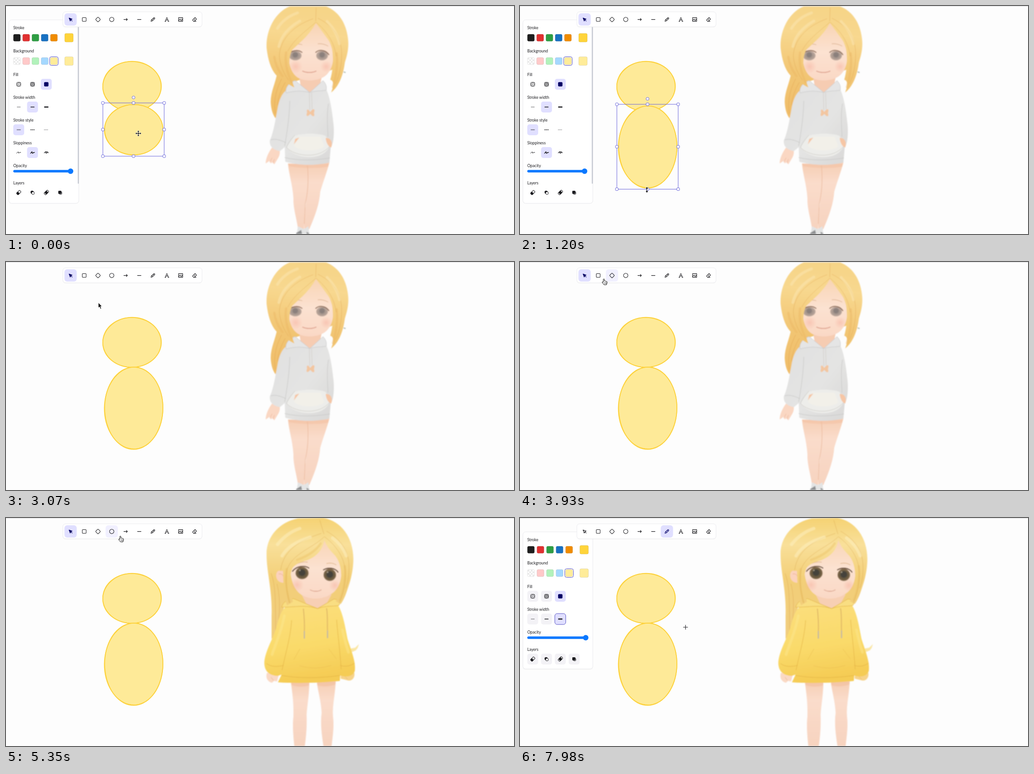
Recreate the animation shown at these times as an HTML page. Size 1117 px wide and 501 px high, loop 8000 ms.

```html
<!DOCTYPE html>
<html lang="en">
<head>
<meta charset="utf-8">
<title>Sketch board</title>
<style>
html, body { margin: 0; width: 100%; height: 100%; overflow: hidden; background: #fdfdfd; }
svg { display: block; width: 1117px; height: 501px; }
text { font: 8.7px Lato, "Open Sans", sans-serif; fill: #1b1b1f; }
.ink { fill: none; stroke: #1b1b1f; stroke-linecap: round; stroke-linejoin: round; }
.on { stroke: #030064; }
.line { fill: none; stroke-linecap: round; stroke-linejoin: round; }
</style>
</head>
<body>
<svg viewBox="0 0 1117 501">
<defs>
  <linearGradient id="hairA" gradientUnits="userSpaceOnUse" x1="660" y1="0" x2="640" y2="245">
    <stop offset="0" stop-color="#f6d487"/><stop offset=".25" stop-color="#f8d88f"/><stop offset=".6" stop-color="#f2c674"/><stop offset="1" stop-color="#f0bd69"/>
  </linearGradient>
  <linearGradient id="hairB" gradientUnits="userSpaceOnUse" x1="670" y1="0" x2="670" y2="265">
    <stop offset="0" stop-color="#f5d273"/><stop offset=".22" stop-color="#f9e09a"/><stop offset=".5" stop-color="#f3cf78"/><stop offset="1" stop-color="#f1cd7d"/>
  </linearGradient>
  <linearGradient id="skin" x1="0" y1="0" x2="0" y2="1">
    <stop offset="0" stop-color="#f8d4b4"/><stop offset=".5" stop-color="#fce2d1"/><stop offset="1" stop-color="#fad8c5"/>
  </linearGradient>
  <linearGradient id="leg" x1="0" y1="0" x2="0" y2="1">
    <stop offset="0" stop-color="#f6ceb4"/><stop offset=".3" stop-color="#fadccb"/><stop offset="1" stop-color="#f7d3bf"/>
  </linearGradient>
  <linearGradient id="grey" x1="0" y1="0" x2="1" y2="1">
    <stop offset="0" stop-color="#e0e0e0"/><stop offset=".55" stop-color="#e4e4e3"/><stop offset="1" stop-color="#d9d8d7"/>
  </linearGradient>
  <linearGradient id="gold" x1="0" y1="0" x2=".2" y2="1">
    <stop offset="0" stop-color="#fbdf7e"/><stop offset=".6" stop-color="#fada6a"/><stop offset="1" stop-color="#f5cc55"/>
  </linearGradient>
  <radialGradient id="blush"><stop offset="0" stop-color="#f5a997" stop-opacity=".45"/><stop offset="1" stop-color="#f5a997" stop-opacity="0"/></radialGradient>
  <radialGradient id="eyeA"><stop offset="0" stop-color="#968a86"/><stop offset=".6" stop-color="#a8988f"/><stop offset="1" stop-color="#c2aca0"/></radialGradient>
  <radialGradient id="eyeB"><stop offset="0" stop-color="#4e4a3c"/><stop offset=".65" stop-color="#66573f"/><stop offset="1" stop-color="#8a7150"/></radialGradient>
  <filter id="soft" x="-5%" y="-5%" width="110%" height="110%"><feGaussianBlur stdDeviation=".8"/></filter>
</defs>
<rect width="1117" height="501" fill="#fdfdfd"/>
<rect width="1117" height="1" fill="#dcdcde"/>

<g id="girlA" filter="url(#soft)">
  <path fill="url(#hairA)" d="M596 148C593 168 582 188 582 211C583 230 588 241 593 247C596 234 602 218 608 204L634 172Z"/>
  <path class="line" stroke="#e0a352" opacity=".7" d="M606 160C594 184 588 206 592 236M614 168C604 185 599 200 597 218"/>
  <path fill="url(#hairA)" d="M624 1C590 14 571 56 573 92C576 118 582 138 594 152L628 168L712 142L743 130C752 105 754 88 752 72C748 38 732 12 704 1Z"/>
  <g fill="url(#leg)">
    <path d="M661 346L711 344C706 364 697 387 691 408C689 434 681 458 667 490H656C656 454 660 430 662 404Z"/>
    <path d="M620 346L664 348C666 385 663 411 658 435C656 460 657 475 655 491L642 489C639 466 631 444 632 422C630 392 622 370 620 346Z"/>
  </g>
  <path class="line" stroke="#e8b394" d="M663 351C666 386 663 414 658 434L656 478"/>
  <path fill="#f1bd9e" opacity=".45" d="M621 347H710L708 353C688 357 650 357 622 352Z"/>
  <path fill="#e3e4e4" d="M642 484L655 490L665 484L667 501H639Z"/>
  <path fill="#8e9092" d="M638 499L649 492L651 501H638ZM661 496L667 500V501H661Z"/>
  <path fill="#fad7c3" d="M585 311L602 317C603 328 599 333 596 338L590 348L586 343L582 346L580 340L571 346C571 335 577 322 585 311Z"/>
  <path class="line" stroke="#eab497" d="M590 337L587 345M585 334L580 343"/>
  <path fill="url(#grey)" d="M618 184C607 191 600 207 597 226C592 253 588 278 580 296C579 309 588 316 602 319L613 310L614 342C642 351 682 351 711 344L714 311C721 302 722 275 720 259C717 231 713 203 705 185C690 174 648 175 618 184Z"/>
  <path class="line" stroke="#c6c6c5" d="M624 209C623 245 619 270 613 307M709 215C705 238 707 260 708 287M582 294C594 291 604 295 615 300M613 333C646 341 680 339 712 334"/>
  <path fill="#ededea" d="M634 285C655 279 684 279 702 285L714 303C706 325 688 332 666 332C645 332 624 323 617 310Z"/>
  <path fill="#f2f0e9" d="M644 287H692L700 308C688 321 646 321 633 307Z"/>
  <path class="line" stroke="#cbc9c4" d="M635 284C625 295 619 304 617 311C634 330 691 339 714 305"/>
  <path fill="#f6c6a5" d="M703 290C715 289 719 301 715 311C709 309 704 301 703 290ZM636 292L645 289L633 304Z"/>
  <path fill="#f6ccb2" d="M645 157H694L690 176L668 190L648 177Z"/>
  <path fill="#e5e5e5" stroke="#c9c9c9" d="M636 164L668 190C647 185 631 187 616 191C613 180 622 168 636 164ZM697 164L668 190C680 186 694 187 704 185C706 176 702 169 697 164Z"/>
  <path class="line" stroke="#d2cdc6" d="M667 191L668 228M672 191L673 226"/>
  <path fill="#f3c6a0" d="M669 233C664 224 660 227 662 234C659 241 662 246 669 237C676 246 680 242 677 235C681 226 675 223 669 233Z"/>
  <path fill="url(#skin)" d="M622 92L682 38L720 90C722 123 716 144 700 155C683 166 655 166 641 157C625 146 619 121 622 92Z"/>
  <circle cx="637" cy="133" r="15" fill="url(#blush)"/><circle cx="704" cy="133" r="13" fill="url(#blush)"/>
  <g fill="url(#eyeA)"><ellipse cx="636" cy="109" rx="14" ry="10.5"/><ellipse cx="695" cy="109" rx="13" ry="10.5"/></g>
  <g fill="#847a77" opacity=".7"><ellipse cx="636" cy="107" rx="6" ry="6"/><ellipse cx="695" cy="107" rx="6" ry="6"/></g>
  <path class="line" stroke="#86644f" stroke-width="2" d="M620 108C626 97 642 95 651 102M681 102C688 95 703 96 710 107"/>
  <path class="line" stroke="#d2a27c" d="M629 88C637 83 645 83 651 85M686 83C694 82 703 85 708 88"/>
  <path class="line" stroke="#d89480" stroke-width="1.4" d="M652 143C660 147 674 147 682 143"/>
  <path fill="url(#hairA)" d="M682 36C668 64 646 80 629 97C618 119 624 150 634 179C620 172 606 162 597 150C580 120 585 64 611 31C632 10 660 16 682 36ZM681 36C698 54 712 74 717 95C721 120 718 145 713 162C720 164 722 172 715 190C733 176 742 150 745 124C752 75 737 35 708 15C696 11 686 20 681 36Z"/>
  <path class="line" stroke="#eab765" stroke-width="5" opacity=".45" d="M616 102C612 126 619 148 628 168M727 104C730 130 726 154 719 178M590 112C592 128 599 142 608 154"/>
  <g class="line" stroke="#dfa552" opacity=".6">
    <path d="M681 36C655 58 631 76 620 99M675 28C635 42 604 70 601 108C602 129 610 147 621 163M682 36C703 53 722 78 726 110M686 27C718 42 739 70 738 107C738 130 734 150 725 170M681 33L682 4"/>
  </g>
  <path class="line" stroke="#fbe7b4" stroke-width="6" opacity=".5" d="M646 33C622 47 605 65 600 89M706 34C721 49 730 67 733 83M641 15C619 23 606 34 597 49"/>
  <path class="line" stroke="#a9b6a7" stroke-width="2" d="M743 145L746 146"/>
</g>

<g id="girlB" filter="url(#soft)">
  <path fill="url(#hairB)" d="M642 1C600 9 571 43 573 82C573 118 586 160 584 214V266L600 246L612 192H728C744 182 760 139 763 105C769 49 740 7 698 0Z"/>
  <path class="line" stroke="#dda954" opacity=".7" d="M583 122C594 150 592 190 593 247M596 145C602 170 603 198 599 230"/>
  <g fill="url(#leg)">
    <path d="M626 358H667C667 390 662 412 661 432C662 457 660 480 657 501H634C631 474 630 453 632 436C633 406 629 380 626 358Z"/>
    <path d="M683 358H725C724 388 717 413 719 436C722 458 718 482 716 501H698C694 474 691 452 694 428C693 403 686 382 683 358Z"/>
  </g>
  <path fill="#efb994" opacity=".45" d="M627 360H667L666 368Q647 374 628 367ZM684 360H725L724 366Q704 373 685 368Z"/>
  <path fill="#fad9c5" d="M574 340L600 344L596 359L589 358L585 362C575 360 570 350 574 340Z"/>
  <path fill="#f7d38a" d="M736 344L766 340C768 350 761 359 752 357L736 353Z"/>
  <path class="line" stroke="#dda46f" opacity=".7" d="M583 350L588 357M746 349L751 354"/>
  <path fill="#fae6a4" d="M757 287L768 285L776 277L773 286L769 291L757 296Z"/>
  <path fill="url(#gold)" d="M621 190C606 199 600 219 594 242C585 270 568 296 568 320C569 337 579 346 597 347L606 344L598 361C642 364 696 362 734 358L735 346C749 351 763 348 767 336C770 317 759 291 751 266C745 234 740 206 729 190Z"/>
  <path class="line" stroke="#e4b444" d="M628 225C626 260 616 292 607 334M727 224C729 252 734 286 737 332M573 320C584 328 597 327 610 324M735 324C747 328 758 325 766 319M606 346C645 353 694 352 734 346"/>
  <path class="line" stroke="#eabf53" opacity=".8" d="M646 288L633 311M710 288L726 309M646 325Q681 335 715 324"/>
  <path class="line" stroke="#fde894" stroke-width="6" opacity=".4" d="M612 215C606 248 594 273 585 300M740 246Q746 274 753 295"/>
  <path fill="#f7cfb4" d="M650 168H716L706 186L685 198L660 188Z"/>
  <path fill="#f9de82" stroke="#e3b244" d="M632 177L685 199C657 190 638 196 606 196C609 185 619 178 632 177ZM721 178L685 199C704 192 718 195 732 192C738 184 732 179 721 178Z"/>
  <path class="line" stroke="#dcb264" stroke-width="1.8" d="M654 200C656 220 657 233 656 250M705 199C708 218 706 235 707 250"/>
  <path class="line" stroke="#bcb4a3" stroke-width="2.4" d="M656 249V264M707 248V263"/>
  <path fill="#fbd2bd" d="M615 119C602 110 594 117 594 126C594 138 604 145 615 141Z"/>
  <path class="line" stroke="#eaa88d" d="M600 123Q607 120 612 132"/>
  <path fill="url(#skin)" d="M625 99L698 44L738 101C740 135 732 157 715 167C696 180 668 180 650 169C632 157 624 133 625 99Z"/>
  <circle cx="640" cy="147" r="15" fill="url(#blush)"/><circle cx="723" cy="148" r="13" fill="url(#blush)"/>
  <g fill="url(#eyeB)"><ellipse cx="651" cy="121" rx="14.5" ry="13.5"/><ellipse cx="712" cy="125" rx="14" ry="13.5"/></g>
  <g fill="#45423a"><circle cx="651" cy="120" r="7"/><circle cx="712" cy="124" r="7"/></g>
  <g fill="#a59a86"><circle cx="646" cy="115" r="1.8"/><circle cx="707" cy="119" r="1.8"/></g>
  <path class="line" stroke="#61452f" stroke-width="2.3" d="M630 117C638 106 656 103 666 110M698 114C708 108 723 109 730 119"/>
  <path class="line" stroke="#d2a268" d="M641 100Q652 95 663 97M705 100Q717 97 726 103"/>
  <path class="line" stroke="#d2937b" stroke-width="1.4" d="M669 158C676 162 687 162 693 158"/>
  <path fill="url(#hairB)" d="M701 42C698 70 684 84 662 93C648 96 637 101 630 110C622 128 624 156 631 184L618 192C610 172 610 145 609 116C592 119 586 102 588 76C594 37 632 7 671 17C687 21 697 31 701 42ZM698 42C703 62 714 72 724 83C735 97 739 118 736 142C736 160 733 174 725 183L736 189C749 172 757 139 759 108C768 58 743 25 711 17C702 22 699 31 698 42Z"/>
  <path class="line" stroke="#e9bd62" stroke-width="5" opacity=".4" d="M617 112C613 138 618 163 623 184M745 106C748 134 741 164 734 180M640 92C660 85 680 74 692 56"/>
  <g class="line" stroke="#d9a64e" opacity=".6">
    <path d="M699 42C674 66 630 78 618 113C613 141 618 166 624 187M693 34C649 48 610 69 604 114M700 41C725 59 745 87 746 119C747 150 739 171 733 186M705 29C735 46 753 71 754 103C755 126 752 140 747 154M699 35L690 5"/>
  </g>
  <path class="line" stroke="#fdeebd" stroke-width="7" opacity=".55" d="M669 42C645 49 620 62 607 83M718 44C732 54 742 67 748 83M646 23C625 30 609 43 597 58"/>
</g>

<g id="shapes"></g>
<g id="select"></g>
<g id="panelA"></g>
<g id="panelB"></g>
<g id="bar"></g>
<g id="cursor"></g>
</svg>
<script>
const LOOP = 8000, $ = id => document.getElementById(id);
const at = (x, y, s) => `<g transform="translate(${x} ${y})">${s}</g>`;
const box = (x, y, w, h, r, fill, more = '') =>
  `<rect x="${x}" y="${y}" width="${w}" height="${h}" rx="${r}" fill="${fill}" ${more}/>`;
const ink = (d, w = 1, more = '') => `<path class="ink" d="${d}" stroke-width="${w}" ${more}/>`;
const show = (id, yes) => { $(id).style.display = yes ? '' : 'none'; };
const LILAC = '#e0dfff';

// Value on a list of [time, value], eased between the entries.
function track(keys, t) {
  let i = keys.findIndex(k => k[0] > t);
  if (i < 0) return keys[keys.length - 1][1];
  if (i === 0) return keys[0][1];
  const [t0, a] = keys[i - 1], [t1, b] = keys[i];
  const u = (t - t0) / (t1 - t0);
  return a + (b - a) * u * u * (3 - 2 * u);
}
const step = (keys, t) => keys.reduce((v, k) => k[0] <= t ? k[1] : v, -1);

function rough(cx, cy, rx, ry, seed) {
  const ring = p => {
    let d = '';
    for (let i = 0; i < 72; i++) {
      const a = i / 72 * Math.PI * 2;
      const k = 1 + .004 * Math.sin(2 * a + p) + .004 * Math.sin(3 * a + 2 * p);
      d += (i ? 'L' : 'M') + (cx + rx * k * Math.cos(a)).toFixed(2) + ' ' + (cy + ry * k * Math.sin(a)).toFixed(2);
    }
    return d + 'Z';
  };
  const pen = 'stroke="#fdd23c" stroke-width="1.6" stroke-linejoin="round"';
  return `<path d="${ring(seed)}" fill="#feea98" ${pen}/><path d="${ring(seed + 1.9)}" fill="none" ${pen}/>`;
}

function selection(x0, y0, x1, y1) {
  const mx = (x0 + x1) / 2, my = (y0 + y1) / 2, pen = 'stroke="#6965db"';
  let s = box(x0, y0, x1 - x0, y1 - y0, 0, 'none', pen);
  for (const x of [x0, mx, x1]) for (const y of [y0, my, y1])
    if (x !== mx || y !== my) s += box(x - 3, y - 3, 6, 6, 1.5, '#fff', pen);
  return s + `<circle cx="${mx}" cy="${y0 - 12}" r="3.2" fill="#fff" ${pen}/>`;
}

const TOOL_X = [142, 172, 202.3, 232.5, 263, 293, 323, 353.7, 384, 414.5];
const TOOLS = [
  'M-3.4-3.4L-.8 3.6L.5.5L3.6-.8ZM.5.5L3.6 3.6',
  'M-3-4.2H3Q4.2-4.2 4.2-3V3Q4.2 4.2 3 4.2H-3Q-4.2 4.2-4.2 3V-3Q-4.2-4.2-3-4.2Z',
  'M-.8-4.7Q0-5.4.8-4.7L4.7-.8Q5.4 0 4.7.8L.8 4.7Q0 5.4-.8 4.7L-4.7.8Q-5.4 0-4.7-.8Z',
  'M-4.8 0A4.8 4.8 0 1 1 4.8 0A4.8 4.8 0 1 1-4.8 0Z',
  'M-4 0H4M1.5-2.4L4 0L1.5 2.4',
  'M-4 0H4',
  'M-4.2 4.2L-3.6 1.4L2-4Q4-4.6 4.2-2.2L-1.4 3.5ZM.6-2.8L2.9-.6M-2.4.4L-.2 2.5',
  'M-3.4 4L-.4-4H.4L3.6 4M-2.1 1H2.1M-4.4 4H-2.2M2.2 4H4.6',
  'M-4.6-4H4.6V4H-4.6ZM-4.4 2.2L-1.5-.6L1.6 2.4L3-.2L4.6 1.4M1.8-1.8H2',
  'M-4.4 1L1.2-4.2L4.6-.8L-.6 4H-2.2ZM-1.8-1.4L1.7 2M-1 4H3.4'
];

function toolbar(active, hover) {
  let s = box(125, 14, 306, 33, 6, '#000', 'opacity=".035"') +
    box(125, 12.8, 306, 33, 6, '#fff', 'stroke="#ebebef"');
  TOOLS.forEach((d, i) => {
    const x = TOOL_X[i], on = i === active;
    if (on || i === hover) s += box(x - 13.5, 16, 27, 27, 6, on ? LILAC : '#f1f0ff');
    const fill = on && !i ? 'style="fill:#030064"' : '';
    s += at(x, 29.6, `<path class="ink ${on ? 'on' : ''}" d="${d}" stroke-width="1.05" ${fill}/>`);
  });
  return s;
}

const BX = [28, 58.3, 88.6, 119];
const hatch = 'M-3.6 0L0-3.6M-3.6 3.4L3.4-3.6M0 3.6L3.6 0';
const frame = box(-4.3, -4.3, 8.6, 8.6, 2, 'none', 'stroke="#1b1b1f"');
const fills = [
  frame + ink(hatch, .9),
  frame + ink(hatch + 'M3.6 0L0-3.6M3.6 3.4L-3.4-3.6M0 3.6L-3.6 0', .9),
  box(-4.8, -4.8, 9.6, 9.6, 2, '#030064')
];
const widths = [.7, 1.7, 2.5].map(w => ink('M-3.6 0H3.6', w));
const styles = [ink('M-4 0H4', .9), ink('M-4 0H4', 1.3, 'stroke-dasharray="1.4 2"'), ink('M-4.5 0H4.5', 1, 'stroke-dasharray=".1 1.8"')];
const waves = [
  ink('M-4.5 1.5Q-1.5-2-.8-1.4Q-1 2 0 1.3Q2-1 4.5-.3'),
  ink('M-4.5 2Q-1.6-2.5-.8-2Q-1.2 2.4 0 1.8Q2-1 4.5-.3M-4 1.4Q-1.5-1.8.2 1.5L4 0', 1.2),
  ink('M-4.5 1Q-2-2.6 0-1.6Q-2 2 .2 1.6Q1-.8 4.5.5M-4 .3Q0-3.5 3.6-1', 1.2)
];
const sheet = (x, y, fill) => box(x, y, 5.4, 5.4, 1.4, fill, 'stroke="#1b1b1f"');
const tilt = s => `<g transform="rotate(-45)">${s}</g>`;
const layers = [
  tilt(sheet(-5, -2.7, '#1b1b1f') + sheet(-.4, -2.7, '#fff')),
  sheet(-3.6, -3.6, '#1b1b1f') + sheet(-1.6, -1.6, '#fff'),
  tilt(sheet(-5, -2.7, '#fff') + sheet(.2, -2.7, '#fff') + sheet(-2.6, -2.7, '#1b1b1f')),
  sheet(-1.6, -1.6, '#fff') + box(-4, -4, 6.8, 6.8, 1.4, '#1b1b1f')
];

function buttons(icons, y, active, plain, ring) {
  return icons.map((icon, i) => {
    const on = i === active, edge = on && ring ? 'stroke="#5753c6"' : '';
    return (on || !plain ? box(BX[i] - 12, y - 12, 24, 24, 5, on ? LILAC : '#f3f2f6', edge) : '') + at(BX[i], y, icon);
  }).join('');
}

function panel(full, thick, ring) {
  const gap = full ? 20.35 : 21, last = full ? 138.5 : 141;
  const label = (s, y) => `<text x="16" y="${y}">${s}</text>`;
  const swatch = (x, y, c, size = 15.5) =>
    box(x - size / 2, y - size / 2, size, size, 3, c, 'stroke="#000" stroke-opacity=".12" stroke-width=".8"');
  const row = (y, colors) => colors.map((c, i) => swatch(24 + gap * i, y, c)).join('');
  let s = box(5.5, 31.5, 155, full ? 403 : 302, 6, '#000', 'opacity=".03"') +
    box(6.5, 30.5, 153.5, full ? 403 : 301, 6, '#fff', 'stroke="#ececf0"');
  s += label('Stroke', 50.5) + row(69.7, ['#1e1e1e', '#e03131', '#2f9e44', '#1971c2', '#f08c00']) + swatch(last, 69.7, '#ffd43b', 19);
  s += label('Background', 102) + row(121, ['#fff', '#ffc9c9', '#b2f2bb', '#a5d8ff', '#ffec99']) + swatch(last, 121, '#ffec99', 19);
  for (let i = 0; i < 8; i++) s += box(17 + (i * 2 + (i >> 1)) % 4 * 3.5, 114 + (i >> 1) * 3.5, 3.5, 3.5, 0, '#e8e8e8');
  s += box(24 + gap * 4 - 9.5, 111.5, 19, 19, 4, 'none', 'stroke="#5753c6"');
  s += label('Fill', 153.5) + buttons(fills, 172, 2, full);
  s += label('Stroke width', 203.5) + buttons(widths, 222, thick, full, ring);
  if (full) {
    s += label('Stroke style', 253.5) + buttons(styles, 272, 0, true);
    s += label('Sloppiness', 303.5) + buttons(waves, 322, 1, true);
    s += box(157.8, 46, 2.4, 344.5, 1, '#c5c9d2');
  }
  const y = full ? 363 : 263, knob = full ? 142 : 144.5;
  s += label('Opacity', y - 9.5) + box(16, y - 2.7, knob - 14, 5.4, 2.7, '#0a78ff') +
    `<circle cx="${knob}" cy="${y}" r="6" fill="#0a78ff"/>`;
  return s + label('Layers', y + 28.5) + buttons(layers, y + 47, -1, full);
}

const cursorPath = (d, fill, edge, w) =>
  `<path d="${d}" fill="${fill}" stroke="${edge}" stroke-width="${w}" stroke-linejoin="round"/>`;
const CURSORS = {
  arrow: cursorPath('M0 0V11.6L2.6 9.2L4.6 14L6.8 13L4.8 8.5H8.3Z', '#000', '#fff', 1),
  move: cursorPath('M0-6.6L2.6-3.6H.9V-.9H3.6V-2.6L6.6 0L3.6 2.6V.9H.9V3.6H2.6L0 6.6L-2.6 3.6H-.9V.9H-3.6V2.6L-6.6 0L-3.6-2.6V-.9H-.9V-3.6H-2.6Z', '#000', '#fff', .7),
  size: cursorPath('M0-6.6L3.4-2.6H1V2.6H3.4L0 6.6L-3.4 2.6H-1V-2.6H-3.4Z', '#000', '#fff', .8),
  hand: cursorPath('M-1.3 6V.8Q-.9-.6.4-.2Q1.2 0 1.2 1V4.3Q2.4 3.5 3.2 4.6Q4.6 4 5.2 5.2Q7 4.9 7 6.6Q7 9.6 5.6 12.5H.4L-3.6 7.8Q-4 6-2.4 6.1L-1.3 7Z', '#fff', '#000', 1) +
    ink('M1.4 7.5V10M3.2 7.5V10M5 7.5V10', .7),
  cross: ink('M-4.8 0H4.8M0-4.8V4.8', 1.1)
};

const PATH = [
  [0, 291, 280, 'move'], [50, 291, 280, 'move'], [160, 291, 283, 'move'], [300, 284, 318, 'move'],
  [350, 279, 336, 'arrow'], [430, 274, 339, 'arrow'], [580, 274, 339, 'arrow'], [630, 277, 337, 'size'],
  [690, 278, 335, 'size'], [990, 278, 335, 'size'], [1200, 279, 404, 'size'], [1440, 279, 404, 'size'],
  [1470, 280, 385, 'move'], [1560, 281, 327, 'move'], [1690, 282, 337, 'move'], [1840, 282, 337, 'move'],
  [1950, 282, 339, 'move'], [2129, 282, 339, 'move'], [2130, 280, 331.5, 'arrow'], [2340, 88, 80, 'arrow'],
  [2640, 88, 80, 'arrow'], [2750, 187, 94, 'arrow'], [2930, 187, 94, 'arrow'], [3160, 211, 87, 'arrow'],
  [3520, 211, 87, 'arrow'], [3720, 270, 52, 'arrow'], [3870, 270, 52, 'hand'], [3930, 184.5, 37.5, 'hand'],
  [4100, 172, 34, 'hand'], [4380, 182, 30, 'hand'], [4660, 170, 36, 'hand'], [4930, 170, 36, 'hand'],
  [5180, 228, 34, 'hand'], [5350, 251.5, 40, 'hand'], [5500, 238, 36, 'hand'], [5720, 286, 28, 'hand'],
  [5750, 287, 28, 'hand'], [5860, 331, 33, 'hand'], [6040, 331, 33, 'hand'], [6300, 347, 30, 'hand'],
  [6600, 326, 24, 'hand'], [6750, 321.5, 33.5, 'hand'], [6780, 321.5, 33.5, 'hand'], [6830, 146, 139, 'hand'],
  [7150, 88, 221, 'hand'], [7350, 88, 221, 'hand'], [7650, 51, 211, 'hand'], [7720, 125, 224, 'hand'],
  [7780, 190, 233, 'cross'], [7980, 364, 240, 'cross']
];
const PATH_X = PATH.map(k => [k[0], k[1]]), PATH_Y = PATH.map(k => [k[0], k[2]]), KIND = PATH.map(k => [k[0], k[3]]);
const TOP = [[50, 213], [160, 216], [1560, 216], [1690, 226], [1840, 226], [1950, 227.5]];
const TALL = [[990, 117], [1200, 186.5]];
const HOVER = [[3890, 2], [3960, 1], [4940, 1], [5040, 2], [5140, 3], [5590, 4], [5680, 5], [5810, 6]];
const DESELECT = 3020, SWAP = 4300, PENCIL = 6100, THICK = 7250;

$('panelA').innerHTML = panel(true, 1, false);
const memo = {};
function put(id, html) {
  if (memo[id] !== html) $(id).innerHTML = memo[id] = html;
}

function draw(t) {
  const y0 = track(TOP, t), h = track(TALL, t), pencil = t >= PENCIL;
  put('shapes', rough(277, 176.6, 64.2, 54.9, 1.1) + rough(280.9, y0 + h / 2 + .3, 64.3, h / 2 - 3.2, 2.6));
  put('select', t < DESELECT ? selection(213, y0, 347.8, y0 + h) : '');
  show('panelA', t < DESELECT);
  show('panelB', pencil);
  put('panelB', panel(false, t < THICK ? 1 : 2, t >= THICK));
  put('bar', toolbar(pencil ? 6 : 0, pencil ? -1 : step(HOVER, t)));
  show('girlA', t < SWAP);
  show('girlB', t >= SWAP);
  put('cursor', at(track(PATH_X, t).toFixed(2), track(PATH_Y, t).toFixed(2), CURSORS[step(KIND, t)]));
}

const start = performance.now();
function tick() {
  draw((performance.now() - start) % LOOP);
  requestAnimationFrame(tick);
}
draw(0);
requestAnimationFrame(tick);
</script>
</body>
</html>
```
